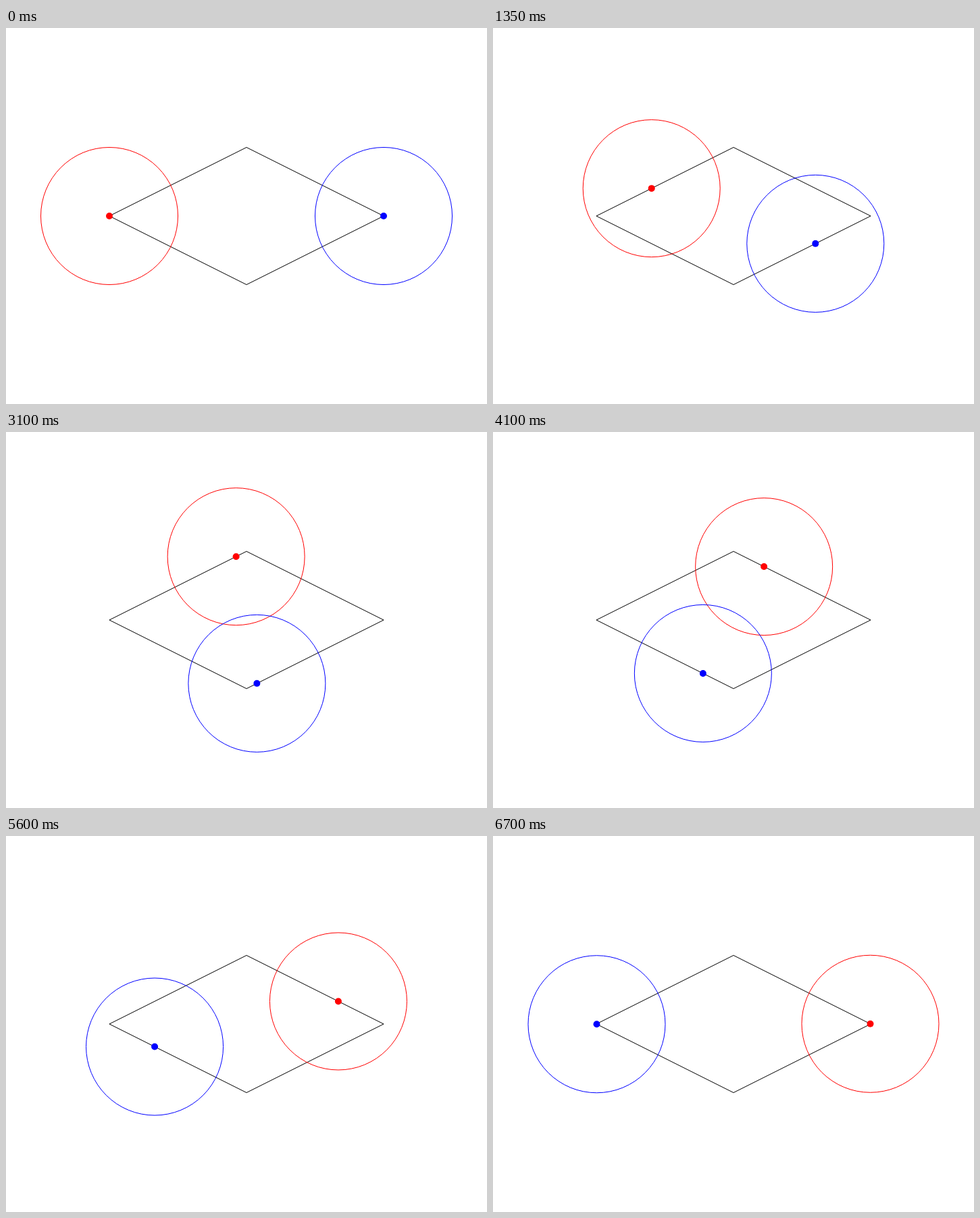
Animation, 712 px wide and 556 px high, one loop 7.75 s. Source, as an HTML page:

```html
<!DOCTYPE html>
<html>
<head>
<meta charset="utf-8">
<style>
  html, body { margin: 0; height: 100%; overflow: hidden; background: #fff; }
  svg { display: block; width: 712px; height: 556px; }
</style>
</head>
<body>
<svg viewBox="0 0 712 556" fill="none" stroke-width="1">
  <path d="M153 278L356 176.5L559 278L356 379.5Z" stroke="#000"/>
  <g id="red" stroke="#f00"><circle r="101.5"/><circle r="5" fill="#f00" stroke="none"/></g>
  <g id="blue" stroke="#00f"><circle r="101.5"/><circle r="5" fill="#00f" stroke="none"/></g>
</svg>
<script>
const LOOP = 7750, STEP = 50, LAST = 134;
const R = 101.5;
// Each step travels R/30 along a side of slope 1/2.
const DX = R / 30 * 2 / Math.sqrt(5);
const red = document.getElementById('red');
const blue = document.getElementById('blue');

function place(el, x, y) {
  el.setAttribute('transform', `translate(${356 + x} ${278 + y})`);
}

function draw() {
  const t = performance.now() % LOOP;
  const step = Math.min(LAST, Math.floor(t / STEP));
  const x = -2 * R + step * DX;
  const y = Math.abs(x) / 2 - R;
  place(red, x, y);
  place(blue, -x, -y);
  requestAnimationFrame(draw);
}
draw();
</script>
</body>
</html>
```
